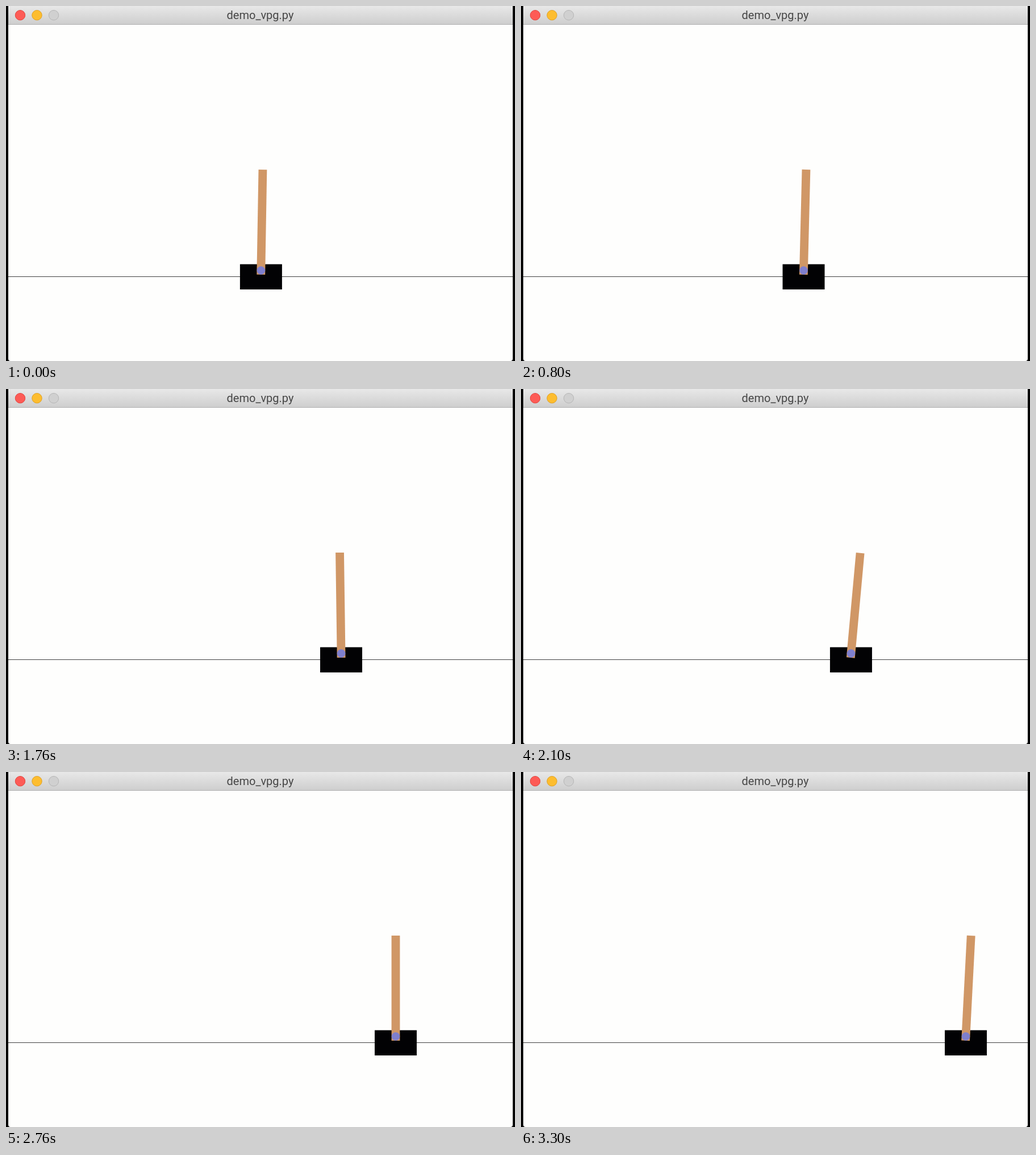
Animation of 896x625 px, one loop 3460 ms. Source, as an HTML page with a canvas:

```html
<!DOCTYPE html>
<html lang="en">
<head>
<meta charset="utf-8">
<title>Cart and pole</title>
<style>
  html, body { margin: 0; width: 100%; height: 100%; overflow: hidden; background: #000; }
  canvas { display: block; }
</style>
</head>
<body>
<canvas id="stage" width="896" height="625"></canvas>
<script>
const ctx = document.getElementById('stage').getContext('2d');
const LOOP = 3460;
const LAST_STEP = 99;
const UNIT = 185;               // pixels per metre, also the pole length
const SWING = UNIT * 2 / 3;     // height of the pole's centre of percussion
const PIVOT_Y = 465.6;

// The centre of percussion glides smoothly; the cart swings around it
// as the pole leans. Both are curves through [step, value].
const glide = curve([
  [0, 451], [8, 455.5], [16, 474], [24, 500.6], [38, 558], [48, 583.5],
  [53, 588.3], [64, 594], [72, 620.1], [83, 686], [99, 789.4]
]);
const lean = curve([
  [0, .017], [8, .085], [16, .087], [24, .025], [38, -.038], [49, -.112],
  [53, -.014], [57, .065], [62, .075], [66, .148], [72, .094], [83, 0], [99, .052]
]);

// Smooth curve with slopes taken from the neighbouring chords
function curve(points) {
  const chord = i => {
    const [a, b] = [points[i], points[i + 1]];
    return (b[1] - a[1]) / (b[0] - a[0]);
  };
  const slopes = points.map((p, i) => {
    if (i === 0) return chord(0);
    if (i === points.length - 1) return chord(i - 1);
    const before = p[0] - points[i - 1][0];
    const after = points[i + 1][0] - p[0];
    return (chord(i - 1) * after + chord(i) * before) / (before + after);
  });
  return step => {
    let i = 0;
    while (i < points.length - 2 && step >= points[i + 1][0]) i++;
    const [start, value] = points[i];
    const span = points[i + 1][0] - start;
    const u = (step - start) / span;
    const v = 1 - u;
    const bend = (slopes[i] - chord(i)) * v - (slopes[i + 1] - chord(i)) * u;
    return value + span * u * (chord(i) + v * bend);
  };
}

// Thirty steps a second, on a 10 ms clock
function stepAt(ms) {
  const tick = Math.floor(ms / 10) + 1;
  return Math.min(LAST_STEP, Math.ceil(tick * 3 / 10) - 1);
}

function rect(x, y, w, h, fill) {
  ctx.fillStyle = fill;
  ctx.fillRect(x, y, w, h);
}

function disc(x, y, r, fill, stroke) {
  ctx.beginPath();
  ctx.arc(x, y, r, 0, Math.PI * 2);
  ctx.fillStyle = fill;
  ctx.fill();
  if (stroke) {
    ctx.strokeStyle = stroke;
    ctx.lineWidth = 1;
    ctx.stroke();
  }
}

function drawWindow() {
  rect(0, 0, 896, 625, '#000');
  ctx.fillStyle = '#fefefd';
  ctx.beginPath();
  ctx.roundRect(4, 0, 888, 625, [0, 0, 4, 4]);
  ctx.fill();

  const bar = ctx.createLinearGradient(0, 0, 0, 32);
  bar.addColorStop(0, '#e8e8e8');
  bar.addColorStop(1, '#cecece');
  rect(4, 0, 888, 32, bar);
  rect(4, 32, 888, 1, '#b0b0b0');

  disc(25, 16.2, 8.7, '#fd5b56', '#e2453f');
  disc(54.5, 16.2, 8.7, '#fdbd2f', '#dfa023');
  disc(84, 16.2, 8.7, '#d0d0d0', '#b6b6b6');

  ctx.fillStyle = '#464646';
  ctx.font = '20px Roboto, sans-serif';
  ctx.textAlign = 'center';
  ctx.fillText('demo_vpg.py', 447.5, 23);
}

function drawCartPole(step) {
  const angle = lean(step);
  const x = glide(step) - SWING * angle;
  rect(4, 476, 888, 1, '#404040');
  rect(x - 37, 454.6, 74, 44.4, '#020204');

  ctx.save();
  ctx.translate(x, PIVOT_Y);
  ctx.rotate(angle);
  rect(-7.4, 7.4 - UNIT, 14.8, UNIT, '#d09766');
  ctx.restore();

  disc(x, PIVOT_Y, 7.3, '#7f7fcd');
}

function frame() {
  drawWindow();
  drawCartPole(stepAt(performance.now() % LOOP));
  requestAnimationFrame(frame);
}

frame();
</script>
</body>
</html>
```
